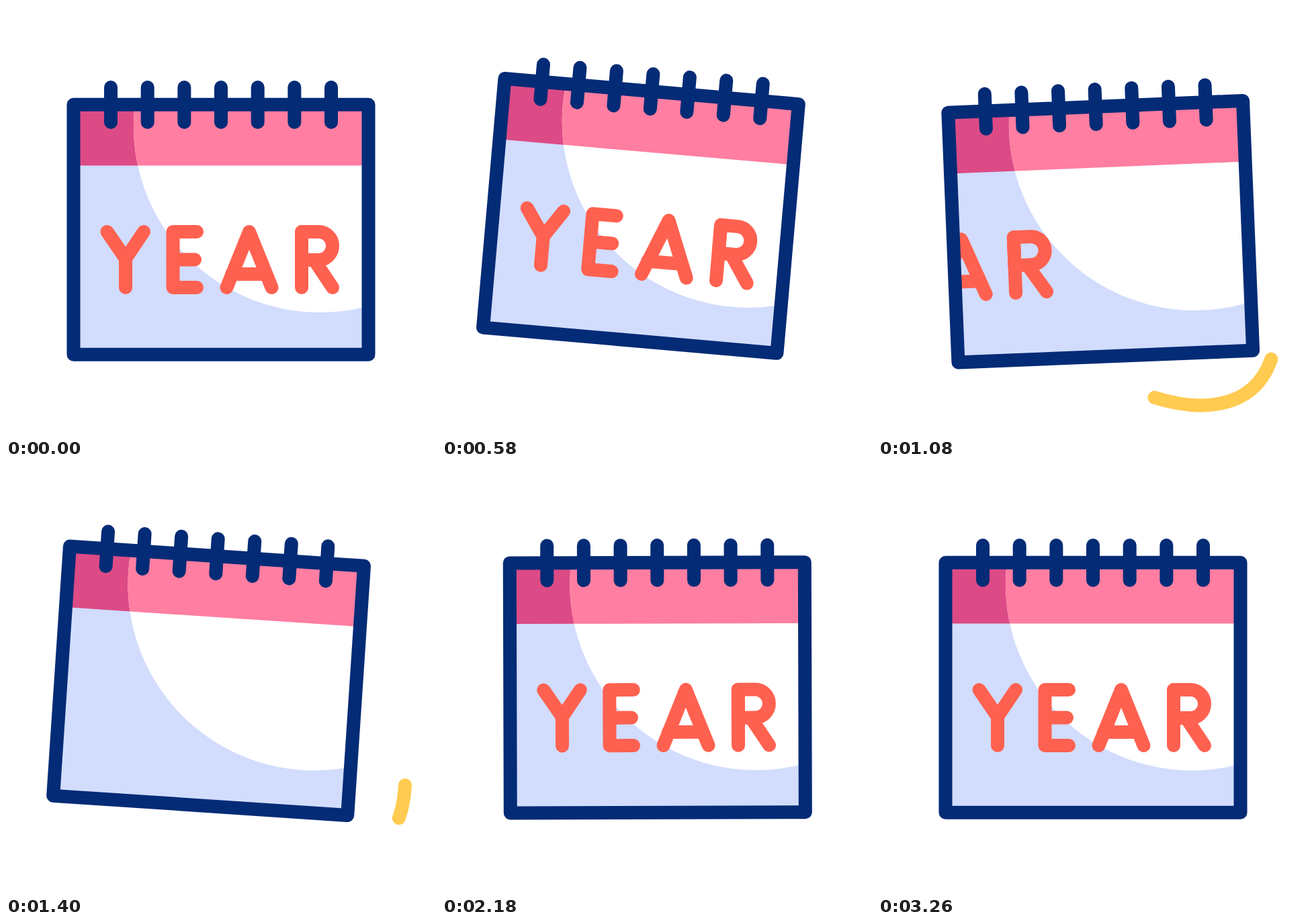
An HTML page that plays this animation: 640x640 px, repeating every 3.38 s.

```html
<!DOCTYPE html>
<html lang="en">
<head>
<meta charset="utf-8">
<title>Year calendar</title>
<style>
  html, body { margin: 0; height: 100%; overflow: hidden; background: #fff; }
  svg { display: block; width: 100vw; height: 100vh; }
  .line { fill: none; stroke-linecap: round; stroke-linejoin: round; stroke-width: 20; }
  .navy { stroke: #042b76; }
  .red { stroke: #ff6150; }
  .ink { stroke-width: 24; }
</style>
</head>
<body>
<svg viewBox="0 0 640 640">
  <defs>
    <clipPath id="page"><rect x="105" y="150" width="430" height="366"/></clipPath>
    <clipPath id="disc"><circle cx="467" cy="179" r="277"/></clipPath>
  </defs>
  <path id="swoosh" class="line" stroke="#ffcb50" pathLength="1" d="M387 574C460 604 586 620 594 478"/>
  <g id="calendar">
    <path fill="#d2dcfd" d="M100 147H540V519H100Z"/>
    <path fill="#dc4b86" d="M100 147H540V237.500H100Z"/>
    <g clip-path="url(#disc)">
      <path fill="#fff" d="M100 147H540V519H100Z"/>
      <path fill="#ff7ea1" d="M100 147H540V237.500H100Z"/>
    </g>
    <g clip-path="url(#page)"><g id="word"></g></g>
    <path class="line navy" d="M100.500 146.800H539.500V518.800H100.500Z"/>
    <path id="rings" class="line navy"/>
  </g>
</svg>
<script>
const LOOP = 3380;
const PIVOT = [320, 56];
const byId = id => document.getElementById(id);

// Separate strokes of Y, E, A and R, each in drawing direction
const strokes = [
  'M150.500 336L178 376L205 336', 'M178 419V376',
  'M284 336H248.500V419H284', 'M281 377.500H248.500',
  'M328.500 419L362 336L395.500 419', 'M336 399H387',
  'M440 336V419', 'M486 357A21 21 0 0 1 465 378H440V336H465A21 21 0 0 1 486 357', 'M460 380L486 419'
];

function addStrokes(className) {
  return strokes.map(d => {
    const path = document.createElementNS('http://www.w3.org/2000/svg', 'path');
    path.setAttribute('class', className);
    path.setAttribute('d', d);
    path.setAttribute('pathLength', 1);
    return byId('word').appendChild(path);
  });
}

addStrokes('line red');
const inkStrokes = addStrokes('line navy ink');
byId('rings').setAttribute('d',
  Array.from({ length: 7 }, (_, i) => `M${156 + i * 54.67} 121V173`).join(''));

const linear = (t, from, to) => Math.min(1, Math.max(0, (t - from) / (to - from)));
const ease = (t, from, to) => {
  const x = linear(t, from, to);
  return x * x * (3 - 2 * x);
};

// Eased value through [time, value] keys
function keyed(t, keys) {
  let value = keys[0][1];
  for (let i = 1; i < keys.length; i++) {
    value += (keys[i][1] - keys[i - 1][1]) * ease(t, keys[i - 1][0], keys[i][0]);
  }
  return value;
}

// Show only the part of a path between two fractions
function trim(path, start, end) {
  const length = end - start;
  path.style.visibility = length > 0.001 ? 'visible' : 'hidden';
  path.style.strokeDasharray = `${Math.max(length, 0.001)} 2`;
  path.style.strokeDashoffset = -start;
}

const swing = [[255, 0], [590, 5], [957, -5], [1322, 5], [1690, -5], [2240, 0]];
const bounce = [[155, 0], [555, -20], [920, 20], [1280, -20], [1640, 20], [1975, 0]];
const slide = [[743, 0], [1343, -420], [1494, -420], [2080, 0]];

function draw(now) {
  const t = now % LOOP;
  byId('calendar').setAttribute('transform',
    `translate(0 ${keyed(t, bounce)}) rotate(${keyed(t, swing)} ${PIVOT})`);
  byId('word').setAttribute('transform', `translate(${keyed(t, slide)} 0)`);
  trim(byId('swoosh'), ease(t, 970, 1560), ease(t, 640, 1240));
  const start = linear(t, 2780, 3250), end = linear(t, 2300, 2780);
  inkStrokes.forEach(path => trim(path, start, end));
  requestAnimationFrame(() => draw(performance.now()));
}
draw(0);
</script>
</body>
</html>
```
